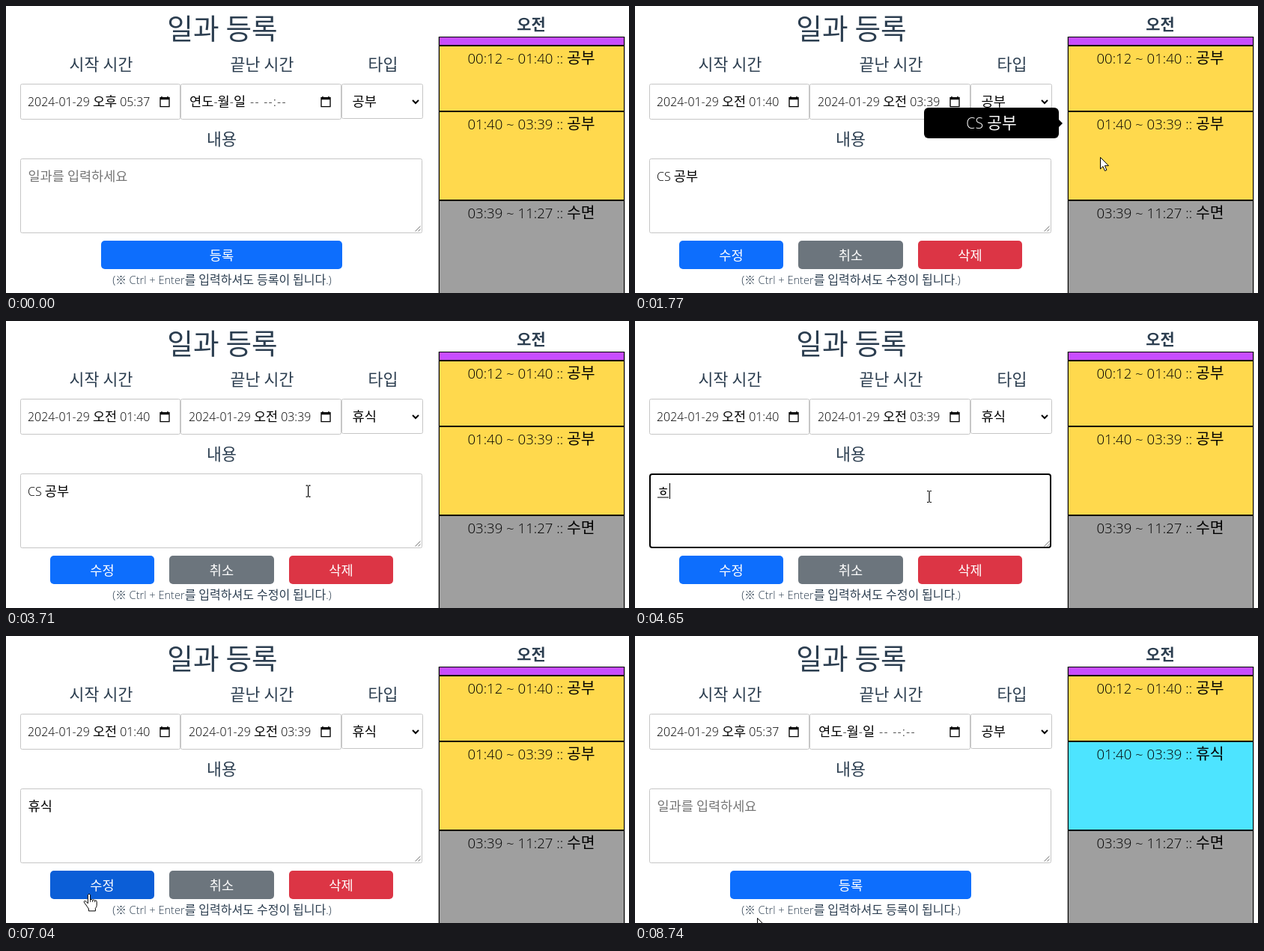
An HTML page for the animation above (8810 ms loop, 832 by 384 pixels).

```html
<!DOCTYPE html>
<html lang="ko">
<head>
<meta charset="utf-8">
<title>일과 등록</title>
<style>
  html, body { margin: 0; width: 100%; height: 100%; overflow: hidden; background: #fff; }
  svg { display: block; font-family: 'Open Sans', 'Noto Sans CJK KR', sans-serif; font-weight: 350; }
  text { white-space: pre; }
  .ko { font-size: 1.1em; }
  .menu { filter: drop-shadow(0 14px 14px rgba(0, 0, 0, .2)); }
</style>
</head>
<body>
<svg id="stage" width="832" height="384" viewBox="0 0 832 384"></svg>
<script>
const LOOP = 8810;
const INK = '#2c3e50';
const TYPES = ['공부', '휴식', '기타', '운동', '수면', '식사', '게임'];

// Event times in ms
const OPEN_FORM = 1770, OPEN_MENU = 2540, PICK = 3310, FOCUS = 3780, SELECT_ALL = 4250,
      TYPE = 4650, BLUR = 6280, PRESS = 7880, SAVED = 8280, LOADED = 8360;

// Typing steps: time, finished part, part being composed
const KEYS = [[TYPE, '', 'ㅎ'], [4880, '', '휴'], [5030, '', '흇'], [5180, '휴', '시'], [5260, '휴', '식']];

// Pointer moves: first step, last step, number of steps, target x, y
const MOVES = [
  [380, 760, 6, 580, 208], [990, 1070, 2, 574, 206],
  [1310, 1311, 1, 616, 198], [1390, 1391, 1, 609, 190], [1620, 1621, 1, 621, 195],
  [1770, 1771, 1, 621, 202], [1850, 2310, 7, 505, 114],
  [2770, 2930, 3, 475, 184], [3080, 3081, 1, 473, 186], [3160, 3161, 1, 470, 184],
  [3310, 3780, 7, 392.5, 235], [3950, 3951, 1, 393, 235],
  [5810, 6580, 11, 120, 362], [6730, 7040, 5, 111, 345], [7120, 7270, 3, 113, 345],
  [8360, 8740, 6, 163, 377]
];

const rect = (x, y, w, h, fill, more = '') =>
  `<rect x="${x}" y="${y}" width="${w}" height="${h}" fill="${fill}" ${more}/>`;
const path = (d, more) => `<path d="${d}" ${more}/>`;
const text = (s, x, y, size, fill = '#000', more = '') =>
  `<text x="${x}" y="${y}" font-size="${size}" fill="${fill}" ${more}>` +
  s.replace(/[가-힣ㄱ-ㅎ]+/g, k => `<tspan class="ko">${k}</tspan>`) + '</text>';
const mid = (s, x, y, size, fill, more = '') => text(s, x, y, size, fill, 'text-anchor="middle" ' + more);
const field = (x, y, w, h) => rect(x + .5, y + .5, w - 1, h - 1, '#fff', 'rx="2" stroke="#c6c6c6"');
const inside = (p, x, y, w, h) => p.x >= x && p.x < x + w && p.y >= y && p.y < y + h;

const calendar = x => path('M2 3h20v20H2zM4 8v13h16V8zM5 1h2v2H5zM17 1h2v2h-2z',
  `fill-rule="evenodd" transform="translate(${x} 120) scale(.667)"`);

const HEAD = rect(0, 0, 832, 384, '#fff') +
  mid('일과 등록', 289, 43.5, 34.2, INK) + mid('시작 시간', 127, 85.5, 19.7, INK) +
  mid('끝난 시간', 342, 85.5, 19.7, INK) + mid('타입', 503.5, 85.5, 19.7, INK) +
  mid('내용', 288, 185.5, 19.7, INK) + mid('오전', 701.5, 32, 19, INK, 'font-weight="700"') +
  field(19, 104, 214, 48) + field(233, 104, 215, 48) + field(448, 104, 109, 47) +
  calendar(204) + calendar(419) +
  path('M543 126l4 4 4-4', 'fill="none" stroke="#000" stroke-width="2"');

function pointer(t) {
  let x = 568, y = 392;
  for (const [from, to, n, tx, ty] of MOVES) {
    if (t < from) break;
    const gap = (to - from) / (n - 1 || 1);
    const k = Math.min(n, Math.floor((t - from) / gap + 1e-6) + 1) / n;
    x += (tx - x) * k;
    y += (ty - y) * k;
  }
  return { x, y };
}

function drawPointer(p, shape) {
  const line = 'fill="#fff" stroke="#000" stroke-linejoin="round"';
  const shapes = {
    arrow: path('M.5.5V16L4 12.6 6.5 18.5 8.9 17.5 6.4 11.7H11.5Z', line),
    hand: path('M-1.6 1.2q1.6-2.4 3.2 0V8q1.6-1.6 3 .4q1.6-1.2 3 .6q2.4-.8 2.6 1.4v5q0 2-1.8 4v3.5h-9V20' +
      'q-1.5-2-3.4-5-2.6-3-2.8-4.4q.4-2.4 2.6-.4l2.6 2.6Z', line) +
      path('M1.6 8v3M4.6 8.6v2.4M7.6 9.2v2', 'stroke="#000" stroke-width=".8"'),
    beam: path('M-3-7.5h2.5M.5-7.5h2.5M0-7V7M-3 7.5h2.5M.5 7.5h2.5', 'stroke="#000" stroke-width="1.2"')
  };
  return `<g transform="translate(${p.x.toFixed(1)} ${p.y.toFixed(1)})">${shapes[shape]}</g>`;
}

function fields(edit, t) {
  const type = TYPES[edit && t >= PICK ? 1 : 0];
  const dates = edit
    ? text('2024-01-29 오전 01:40', 29, 134, 15.9) + text('2024-01-29 오전 03:39', 244, 134, 15.9)
    : text('2024-01-29 오후 05:37', 29, 134, 15.9) + text('연도-월-일', 245, 134, 16) +
      text('-- --:--', 326, 134, 16, '#000', 'letter-spacing="1.25"');
  return dates + text(type, 462.5, 134, 16);
}

function memo(edit, t) {
  const focus = t >= FOCUS && t < BLUR;
  const caret = x => focus ? rect(x, 217, 1, 21, '#000') : '';
  let s = focus
    ? rect(20, 205, 535, 98, '#fff', 'rx="3" stroke="#000" stroke-width="2"')
    : field(19, 204, 537, 100);
  s += path('M546.5 301.5l7-7M550.5 301.5l3-3', 'stroke="#777"');
  if (!edit) return s + text('일과를 입력하세요', 29.5, 234, 15.9, '#757575');
  if (t < SELECT_ALL) return s + text('CS 공부', 29, 234, 16) + caret(84);
  if (t < TYPE) return s + rect(30, 216, 55, 24, '#3390ff') + text('CS 공부', 29, 234, 16, '#fff');
  const [, done, open] = KEYS.filter(k => t >= k[0]).pop();
  const x = 30 + done.length * 16;
  s += text(done + open, 29.5, 234, 16);
  return s + (focus ? rect(x, 235.5, 15, 1, '#000') : '') + caret(x + 16);
}

function buttons(edit, t, p) {
  const button = (x, w, label, fill) => rect(x, 314, w, 38, fill, 'rx="5"') + mid(label, x + w / 2, 339.5, 16, '#fff');
  const tone = (x, w, base, hover) => inside(p, x, 314, w, 38) ? hover : base;
  const hint = mid(`(※ Ctrl + Enter를 입력하셔도 ${edit ? '수정' : '등록'}이 됩니다.)`, 288.5, 372, 14.6, INK);
  if (!edit) return button(127, 322, '등록', '#0d6efd') + hint;
  return button(59, 139, '수정', t >= PRESS ? '#0a58ca' : tone(59, 139, '#0d6efd', '#0b5ed7')) +
    button(218, 140, '취소', tone(218, 140, '#6c757d', '#5c636a')) +
    button(378, 139, '삭제', tone(378, 139, '#dc3545', '#bb2d3b')) + hint;
}

function schedule(t) {
  const frame = rect(577.5, 41.5, 249, 360, '#fff', 'stroke="#c6c6c6"');
  if (t >= SAVED && t < LOADED) return frame;
  const saved = t >= LOADED;
  const block = (y, h, fill, label) => rect(578.5, y + .5, 247, h - 1, fill, 'stroke="#000"') +
    (label ? mid(label, 701.5, y + 24, 18.6) : '');
  return frame + block(41, 12, '#c84dff') +
    block(53, 88, '#ffd94d', '00:12 ~ 01:40 :: 공부') +
    block(141, 119, saved ? '#4de4ff' : '#ffd94d', '01:40 ~ 03:39 :: ' + TYPES[saved ? 1 : 0]) +
    block(260, 140, '#9f9f9f', '03:39 ~ 11:27 :: 수면');
}

function menu(t, p) {
  if (t < OPEN_MENU || t >= PICK) return '';
  const active = Math.max(0, Math.floor((p.y - 152) / 22));
  const items = TYPES.map((s, i) =>
    (i === active ? rect(449, 152 + 22 * i, 107, 22, '#1967d2') : '') +
    text(s, 462.5, 169 + 22 * i, 16, i === active ? '#fff' : '#000')).join('');
  return `<g class="menu" opacity="${t < OPEN_MENU + 80 ? .6 : 1}">` +
    rect(448.5, 151.5, 108, 155, '#fff', 'rx="5" stroke="#a0a0a0"') + items + '</g>';
}

function tooltip(p) {
  if (!inside(p, 578, 141, 248, 119)) return '';
  return rect(386, 136, 180, 41, '#000', 'rx="6"') + path('M566 152l5 5-5 5z', 'fill="#000"') +
    mid('CS 공부', 476, 164, 19.5, '#fff');
}

function draw(t) {
  const edit = t >= OPEN_FORM && t < SAVED;
  const p = pointer(t);
  const list = t >= OPEN_MENU && t < PICK;
  const shape = !list && inside(p, 19, 204, 537, 100) ? 'beam'
    : t >= OPEN_FORM && (inside(p, 59, 314, 139, 38) || inside(p, 218, 314, 140, 38)) ? 'hand' : 'arrow';
  return HEAD + fields(edit, t) + memo(edit, t) + buttons(edit, t, p) +
    schedule(t) + menu(t, p) + tooltip(p) + drawPointer(p, shape);
}

const stage = document.getElementById('stage');
const start = performance.now();
let last = '';
function tick() {
  const view = draw((performance.now() - start) % LOOP);
  if (view !== last) stage.innerHTML = last = view;
  requestAnimationFrame(tick);
}
tick();
</script>
</body>
</html>
```
